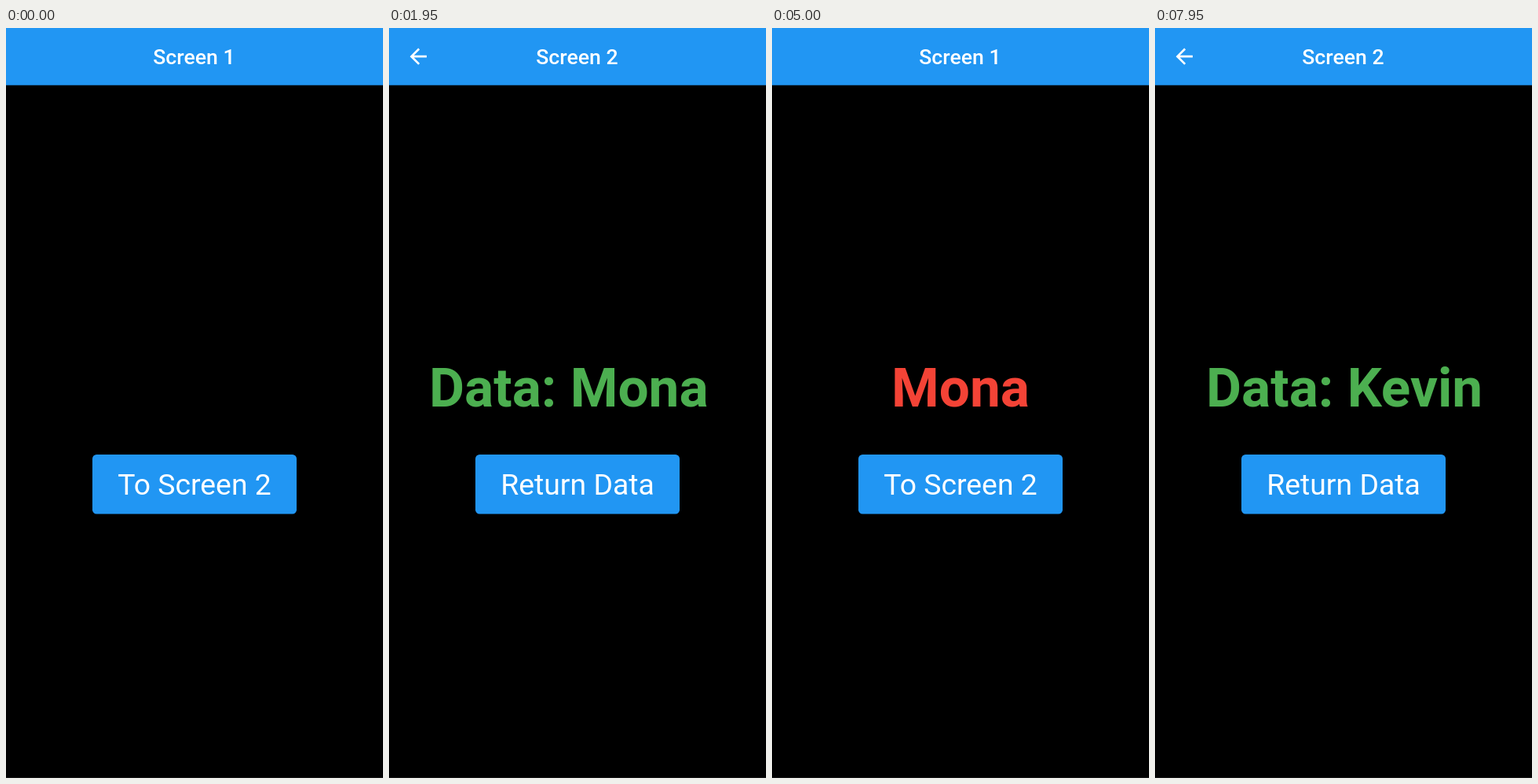
Write an HTML page that moves like this. It is 480 px wide and 953 px high and loops after 8 s.

```html
<!DOCTYPE html>
<html lang="en">
<head>
<meta charset="utf-8">
<title>Passing data between screens</title>
<style>
  html, body { margin: 0; width: 100%; height: 100%; overflow: hidden; background: #000; }
  svg { display: block; width: 100%; height: 100%; }
  text { font-family: Roboto, "Open Sans", sans-serif; text-anchor: middle; fill: #fff; }
  .title { font-size: 26.67px; font-weight: 500; }
  .label { font-size: 37.33px; }
  .data { font-size: 69.33px; font-weight: 700; }
  .blue { fill: #2196f3; }
  #result { fill: #f44336; }
  #received { fill: #4caf50; text-anchor: start; }
</style>
</head>
<body>
<svg viewBox="0 0 480 953">
  <defs>
    <clipPath id="buttonClip"><rect x="110" y="542" width="260" height="75.5" rx="5.3"/></clipPath>
  </defs>
  <rect width="480" height="953"/>
  <g id="first">
    <rect class="blue" width="480" height="72.7"/>
    <text class="title" x="239.4" y="46">Screen 1</text>
    <text class="data" id="result" x="240" y="480.5"></text>
    <rect class="blue" x="110" y="542" width="260" height="75.5" rx="5.3"/>
    <g clip-path="url(#buttonClip)"><circle id="firstRipple" fill="#fff"/></g>
    <text class="label" x="240" y="593">To Screen 2</text>
  </g>
  <g id="second">
    <rect y="-33" width="480" height="1000"/>
    <rect class="blue" y="-33" width="480" height="105.7"/>
    <path fill="#fff" transform="translate(21.3 20.2) scale(1.333)"
      d="M20 11H7.83l5.59-5.59L12 4l-8 8 8 8 1.41-1.41L7.83 13H20z"/>
    <text class="title" x="239.4" y="46">Screen 2</text>
    <text class="data" id="received" y="480.5"></text>
    <rect class="blue" x="110" y="542" width="260" height="75.5" rx="5.3"/>
    <g clip-path="url(#buttonClip)"><circle id="secondRipple" fill="#fff"/></g>
    <text class="label" x="240" y="593">Return Data</text>
  </g>
  <rect y="952" width="480" height="1" fill="#161616"/>
</svg>
<script>
const LOOP = 8000, SLIDE = 300, TRAVEL = 248;
const PUSH_1 = 1117, POP = 3950, PUSH_2 = 7300;
const PEOPLE = [{ name: "Mona", left: 51 }, { name: "Kevin", left: 65 }];
const PRESSES = {
  firstRipple: [{ down: 25, up: PUSH_1, x: 285, y: 590 }, { down: 6600, up: PUSH_2, x: 285, y: 590 }],
  secondRipple: [{ down: 2325, up: POP, x: 300, y: 585 }]
};

const el = id => document.getElementById(id);
const clamp = v => Math.min(1, Math.max(0, v));
const mix = (a, b, k) => a + (b - a) * k;

function bezier(x1, y1, x2, y2) {
  const at = (a, b, s) => 3 * (1 - s) * (1 - s) * s * a + 3 * (1 - s) * s * s * b + s * s * s;
  return x => {
    if (x <= 0 || x >= 1) return clamp(x);
    let lo = 0, hi = 1;
    for (let i = 0; i < 24; i++) {
      const mid = (lo + hi) / 2;
      if (at(x1, x2, mid) < x) lo = mid; else hi = mid;
    }
    return at(y1, y2, lo);
  };
}
const ease = bezier(.25, .1, .25, 1);
const easeIn = bezier(.42, 0, 1, 1);
const fastOutSlowIn = bezier(.4, 0, .2, 1);

// The new page's first painted frame comes some time after its slide begins.
function push(t, start, delay) {
  return t < start + delay ? 0 : clamp((t - start) / SLIDE);
}

function pageProgress(t) {
  if (t < POP) return push(t, PUSH_1, 170);
  if (t < PUSH_2) return 1 - clamp((t - POP) / SLIDE);
  return push(t, PUSH_2, 240);
}

function drawRipple(id, t) {
  const node = el(id);
  const press = PRESSES[id].find(p => t >= p.down && t < p.up + 375);
  if (!press) {
    node.setAttribute("r", 0);
    return;
  }
  const grow = ease(clamp((t - press.down) / 1000));
  const fade = clamp((t - press.down) / 75) * (1 - clamp((t - press.up - 225) / 150));
  node.setAttribute("cx", mix(press.x, 240, grow));
  node.setAttribute("cy", mix(press.y, 579.75, grow));
  node.setAttribute("r", mix(41, 142, grow));
  node.setAttribute("fill-opacity", .23 * fade);
}

function draw(t) {
  const p = pageProgress(t);
  const page = el("second");
  page.setAttribute("display", p > 0 ? "inline" : "none");
  page.setAttribute("opacity", easeIn(p));
  page.setAttribute("transform", `translate(0 ${TRAVEL * (1 - fastOutSlowIn(p))})`);

  const person = PEOPLE[t < PUSH_2 ? 0 : 1];
  el("result").textContent = t < POP ? "" : PEOPLE[0].name;
  el("received").textContent = "Data: " + person.name;
  el("received").setAttribute("x", person.left);

  drawRipple("firstRipple", t);
  drawRipple("secondRipple", t);
}

const begin = performance.now();
function tick() {
  draw((performance.now() - begin) % LOOP);
  requestAnimationFrame(tick);
}
tick();
</script>
</body>
</html>
```
